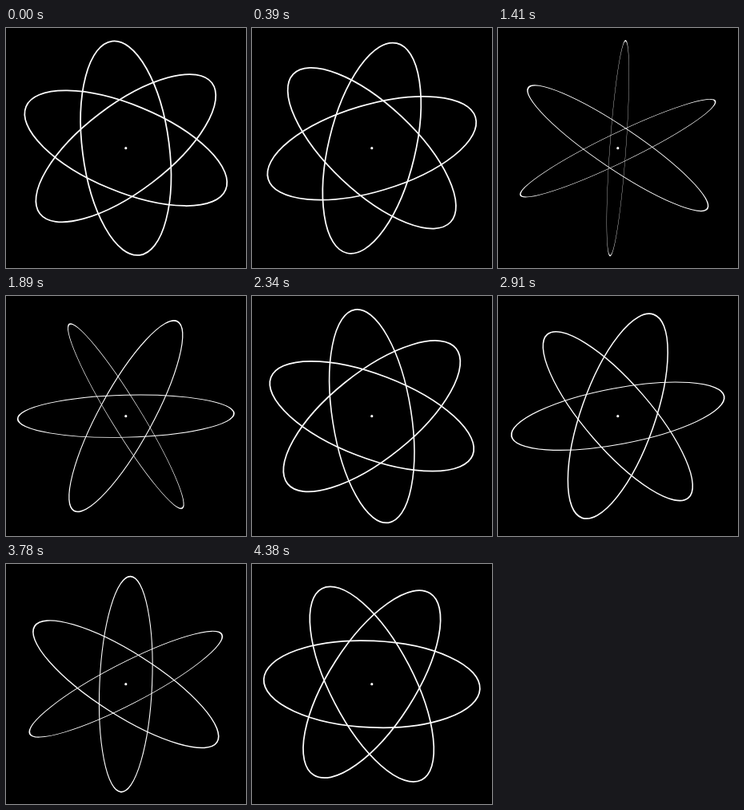
Write an HTML page with a canvas that moves like this. It is 300 px wide and 301 px high and loops after 4410 ms.

```html
<!DOCTYPE html>
<html lang="en">
<head>
<meta charset="utf-8">
<title>Atom</title>
<style>
html, body { margin: 0; width: 100%; height: 100%; overflow: hidden; background: #000; }
canvas { display: block; width: 300px; height: 301px; }
</style>
</head>
<body>
<canvas id="stage"></canvas>
<script>
const LOOP = 4410, TICK = 30, POSES_PER_SECOND = 23.94;
const CX = 149.8, CY = 150.7, RX = 135.2, RY = 54.3;
const rad = deg => deg * Math.PI / 180;

const canvas = document.getElementById('stage');
const ctx = canvas.getContext('2d');
const dpr = window.devicePixelRatio || 1;
canvas.width = 300 * dpr;
canvas.height = 301 * dpr;

// Each orbit turns in the plane and, after its delay, flips about its long axis.
function drawOrbit(i, time) {
  const spin = 45 * time + 60 * i;
  const flip = 90 * Math.max(0, time - 1.21 - 0.1 * i);
  ctx.save();
  ctx.translate(CX, CY);
  ctx.rotate(rad(spin));
  ctx.scale(1, Math.max(0.01, Math.abs(Math.cos(rad(flip)))));
  ctx.beginPath();
  ctx.ellipse(0, 0, RX, RY, 0, 0, 2 * Math.PI);
  ctx.stroke();
  ctx.restore();
}

function draw(ms) {
  // Every fifth tick holds the previous pose.
  const tick = Math.floor((ms % LOOP) / TICK);
  const time = 0.504 + (tick - Math.floor(tick / 5)) / POSES_PER_SECOND;

  ctx.setTransform(dpr, 0, 0, dpr, 0, 0);
  ctx.fillStyle = '#000';
  ctx.fillRect(0, 0, 300, 301);
  ctx.strokeStyle = ctx.fillStyle = '#fff';
  ctx.lineWidth = 1.75;
  for (let i = 0; i < 3; i++) drawOrbit(i, time);
  ctx.beginPath();
  ctx.arc(CX, CY, 1.6, 0, 2 * Math.PI);
  ctx.fill();
}

const start = performance.now();
function loop() {
  draw(performance.now() - start);
  requestAnimationFrame(loop);
}
loop();
</script>
</body>
</html>
```
